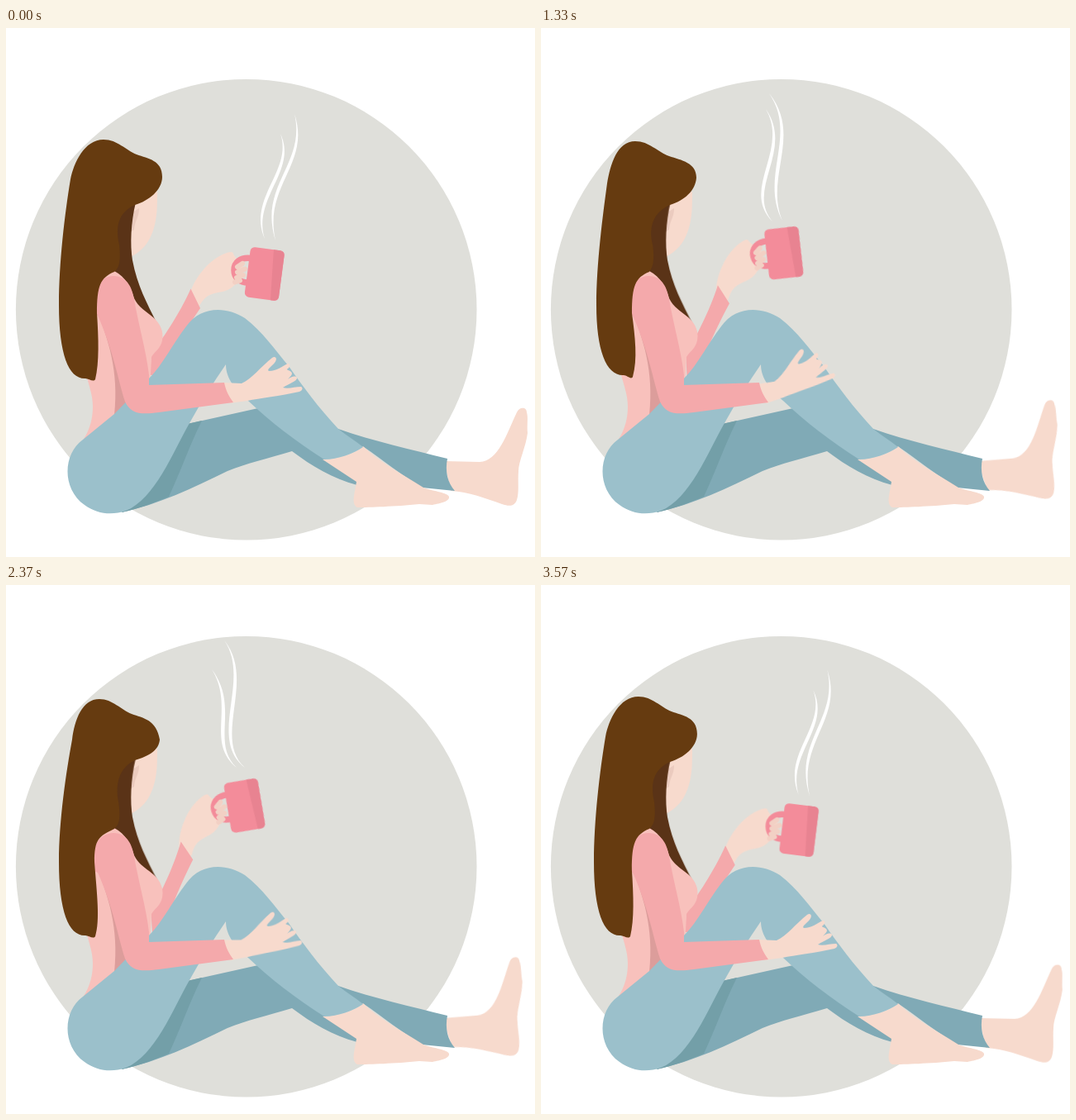
Recreate the animation shown at these times as an HTML page. Size 640 by 640 pixels, loop 3610 ms.

```html
<!DOCTYPE html>
<html lang="en">
<head>
<meta charset="utf-8">
<title>Coffee break</title>
<style>
  html, body { margin: 0; width: 100%; height: 100%; overflow: hidden; background: #fff; }
  svg { display: block; width: 100vw; height: 100vh; }

  .skin { fill: #f7dacd; }
  .sleeve { fill: #f4a9ab; }
  .mug { fill: #f38c9a; }
  .jeans { fill: #9bc0cb; }
  .jeans-back { fill: #80aab6; }
  .steam { fill: #fff; }

  @property --p { syntax: "<number>"; inherits: true; initial-value: 0; }

  .arm, .foot, .rest, .strand, .hair, .steam { animation: 3610ms linear infinite; }

  .arm { animation-name: lift; transform: rotate(calc(var(--p) * -10deg)); transform-origin: 181px 399px; }
  .wrist { transform: rotate(calc(var(--p) * -11.7deg)); transform-origin: 219px 334px; }
  @keyframes lift {
    0%, 100% { --p: 0; }
    2.2% { --p: -.045; }
    14.68% { --p: .19; }
    36.84% { --p: .64; }
    54.85% { --p: 1.03; }
    65.65% { --p: .79; }
    83.93% { --p: .35; }
  }

  .foot { animation-name: tap; transform-origin: 531px 544px; }
  @keyframes tap {
    0%, 100% { transform: rotate(0deg); }
    1.25% { transform: rotate(.2deg); }
    51.25% { transform: rotate(-8.6deg); }
  }

  .rest { animation-name: rest; transform-origin: 272px 442px; }
  @keyframes rest {
    0%, 100% { transform: rotate(0deg); }
    14.68% { transform: rotate(-4.8deg); }
    35.7% { transform: rotate(-11.6deg); }
    53.46% { transform: rotate(-5.7deg); }
    65.65% { transform: rotate(-2.6deg); }
    83.93% { transform: rotate(-.8deg); }
  }

  .strand { animation-name: strand; transform-origin: 152px 270px; }
  @keyframes strand {
    0%, 100% { transform: rotate(0deg); }
    14.68%, 83.93% { transform: rotate(-2.6deg); }
    36.84%, 65.65% { transform: rotate(-.3deg); }
    53.46% { transform: rotate(.6deg); }
  }

  .hair { fill: #663b10; animation-name: hair; }
  @keyframes hair {
    0%, 100% { d: path("M118 135C135 135 145 148 158 153C172 158 189 160 189 180C189 196 173 209 156 214C136 223 132 240 137 262C139 282 137 290 131 295C114 302 110 312 110 345C112 375 113 405 108 425C106 429 100 424 96 424C76 425 64 395 64 335C64 285 71 225 78 183C82 163 95 135 118 135Z"); }
    36.84% { d: path("M114 137C131 137 141 150 155 155C170 160 188 163 188 181C187 197 173 209 156 214C136 223 130 240 135 262C138 282 135 290 131 295C114 302 110 312 110 345C114 375 117 400 111 422C109 426 104 420 100 420C79 421 67 390 67 335C67 285 75 225 80 188C84 165 92 137 114 137Z"); }
    65.65% { d: path("M113 138C129 138 139 151 152 156C166 161 182 163 186 187C185 200 173 207 156 212C137 221 132 240 136 262C139 282 137 290 131 295C112 304 107 308 107 335C110 375 114 405 108 425C106 429 100 424 96 424C76 425 64 395 64 335C64 285 73 225 80 187C83 163 92 138 113 138Z"); }
  }

  .left { animation-name: left; }
  @keyframes left {
    0%, 100% { d: path("M313 255C292 205 347 173 332 128C353 173 298 205 313 255Z"); }
    2.2% { d: path("M315 257C295 206 350 175 337 130C356 175 301 206 315 257Z"); }
    14.68% { d: path("M301 247C283 200 333 160 310 122C339 160 289 200 301 247Z"); }
    36.84% { d: path("M280 234C241 195 301 148 272 98C307 148 247 195 280 234Z"); }
    54.85% { d: path("M265 215C213 184 258 134 226 94C264 134 219 184 265 215Z"); }
    65.65% { d: path("M279 221C241 190 277 148 249 102C283 148 247 190 279 221Z"); }
    83.93% { d: path("M295 241C273 195 324 160 293 116C330 160 279 195 295 241Z"); }
  }

  .right { animation-name: right; }
  @keyframes right {
    0%, 100% { d: path("M326 257C305 190 363 165 349 104C369 165 311 190 326 257Z"); }
    2.2% { d: path("M328 260C307 191 369 170 354 106C375 170 313 191 328 260Z"); }
    14.68% { d: path("M319 243C303 190 334 142 326 94C340 142 309 190 319 243Z"); }
    36.84% { d: path("M292 233C264 180 311 130 276 79C317 130 270 180 292 233Z"); }
    54.85% { d: path("M273 217C220 180 279 114 235 65C285 114 226 180 273 217Z"); }
    65.65% { d: path("M289 221C243 185 297 115 264 67C303 115 249 185 289 221Z"); }
    83.93% { d: path("M313 236C291 185 322 132 310 86C328 132 297 185 313 236Z"); }
  }
</style>
</head>
<body>
<svg viewBox="0 0 640 640">
  <circle cx="290.7" cy="340.7" r="278.8" fill="#dfdfda"/>

  <path class="steam left"/>
  <path class="steam right"/>

  <!-- face -->
  <path class="skin" d="M140 205L183 198C183 212 183 225 180 238C175 258 166 269 151 277L140 270Z"/>
  <path fill="#ebcbbf" d="M161 218C161 230 156 232 155 244L150 247L150 225Z"/>
  <path class="strand" fill="#5a3317" d="M157 211C151 235 150 262 153 281C159 312 170 332 184 360L150 350L125 297L128 225Z"/>

  <!-- arm with the mug -->
  <g class="arm">
    <g class="wrist">
      <path class="skin" d="M222 324C226 305 244 282 262 274C267 272 274 269 275 273C276 278 284 282 287 286L284 304C276 311 272 317 262 319C246 322 242 323 234 336L226 338Z"/>
      <path fill="none" stroke="#f38c9a" stroke-width="7.5" d="M299 279C283 276 276 284 276 293C276 302 283 308 293 308"/>
      <g transform="translate(313 297.5) rotate(7.5)">
        <rect class="mug" x="-21" y="-30.5" width="41.5" height="61" rx="5.5"/>
        <path fill="#e88391" d="M7 -30.5H15Q20.5 -30.5 20.5 -25V25Q20.5 30.5 15 30.5H11Z"/>
      </g>
      <path fill="none" stroke="#f2d0c4" stroke-width="6" stroke-linecap="round" d="M280 289L286 285M280 295.500L289 291.500M279 302L287 299M277 307.500L283 305.500"/>
    </g>
    <path class="sleeve" d="M223.500 315.500L235 339C224 355 213 372 202 392L190 420H174L176 394C188 378 210 346 223.500 315.500Z"/>
  </g>

  <!-- torso -->
  <path fill="#f8c1bc" d="M100 300L131 294C145 301 152 316 155 327C160 338 170 343 178 350C187 358 191 367 189 378C187 388 180 391 176 398L174 440L140 475L93 499C102 485 105 472 105 458C105 445 101 434 97 420Z"/>
  <path fill="#dc9d9b" d="M111 345C123 375 137 415 131 468L150 460L135 395Z"/>

  <!-- legs -->
  <path class="skin foot" d="M530 524L573 525C596 524 606 490 618 465C621 458 630 458 630 465C632 472 630 480 631 490C629 507 620 524 620 536C619 550 621 561 618 571C615 579 609 579 600 576C580 569 560 561 538 560Z"/>
  <path class="jeans-back" d="M215 480L305 460L402 485C445 500 490 510 534 521C531 536 534 550 543 560L503 556C480 542 455 522 433 507L385 521L425 548V553C395 545 370 530 346 512C316 521 290 527 268 536C225 557 185 576 140 586Z"/>
  <path fill="#739fa8" d="M215 480L237 475C222 505 212 535 197 567C180 574 160 582 140 586Z"/>
  <path class="skin" d="M383 522C405 521 422 515 432 506C450 524 480 540 505 556C519 561 534 562 536 567C537 573 525 575 516 577L500 576C470 579 440 580 425 580C417 576 422 563 424 549Z"/>
  <path class="jeans" d="M93 498L131 467L173 424C190 407 203 380 218 361C235 337 265 336 289 351C310 367 325 389 342 409C360 435 378 459 402 485C412 493 422 499 432 507C420 515 402 522 385 522C351 500 319 476 293 451C277 437 266 424 266 407C250 430 236 453 222 478C202 513 180 570 145 584C128 590 110 588 95 577C67 557 69 515 93 498Z"/>

  <!-- resting arm -->
  <path class="skin rest" d="M262 429L285 430C298 424 308 410 322 399C326 396 329 400 325 405C321 410 315 413 318 415C328 415 334 409 341 406C344 406 344 410 341 412C338 414 343 414 345 416C348 419 343 422 341 425C345 422 350 420 352 423C353 427 343 430 335 435C341 437 350 434 357 434C360 436 358 439 355 440C332 445 307 448 292 451L270 454Z"/>
  <path class="sleeve" d="M104 345C104 315 112 301 130 300C148 300 153 317 155 328C160 358 170 392 173 420V432L264 429C266 439 270 446 275 453L185 465C163 468 151 467 144 452C136 428 130 390 111 348Z"/>

  <path class="hair"/>
</svg>
</body>
</html>
```
